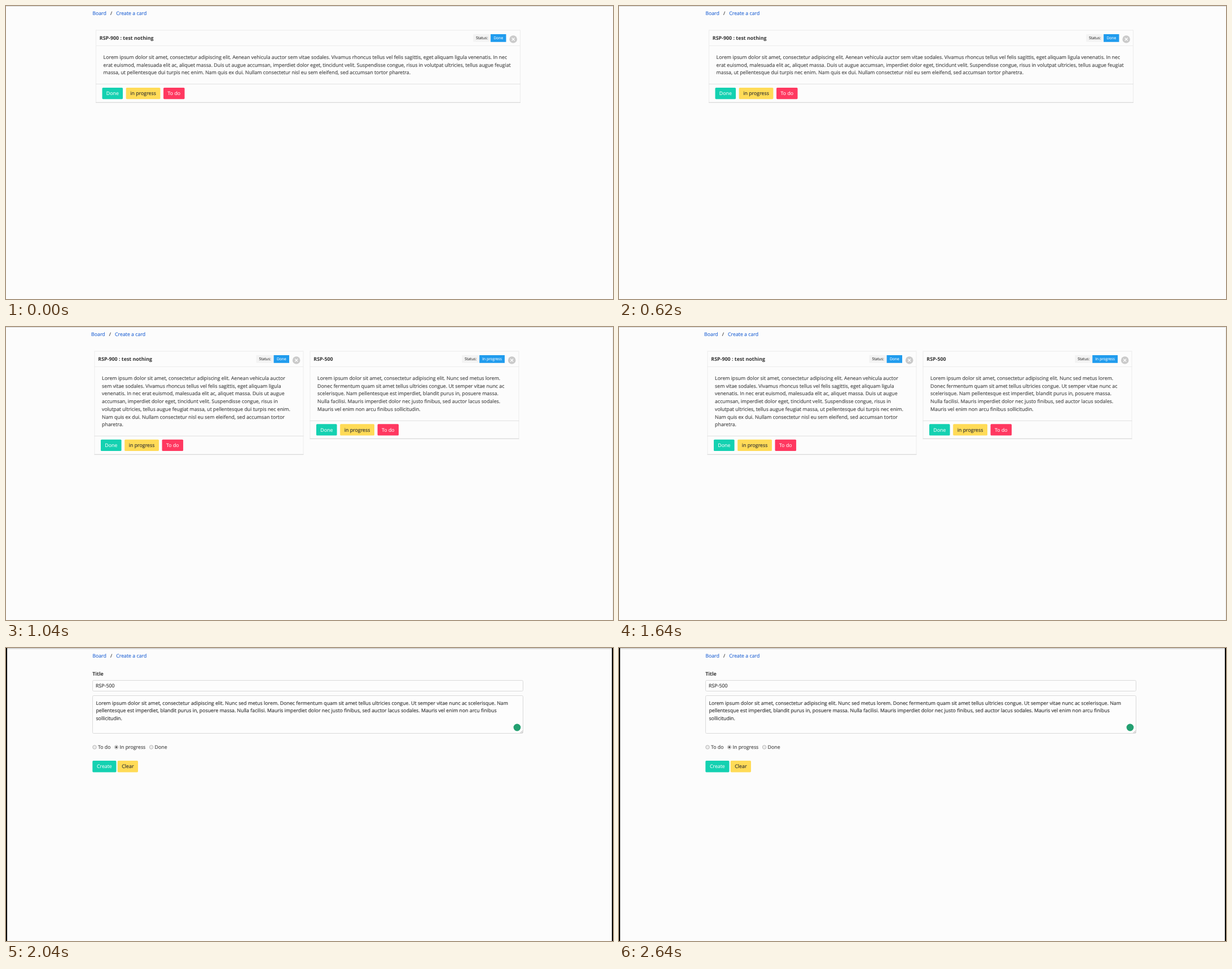
Recreate the animation shown at these times as an HTML page. Size 1076 by 520 pixels, loop 3040 ms.

```html
<!DOCTYPE html>
<html lang="en">
<head>
<meta charset="utf-8">
<title>Card board</title>
<style>
  html, body { margin: 0; width: 100%; height: 100%; overflow: hidden; background: #fcfcfc; }
  svg { display: block; }
  text {
    --ink: #444;
    font: 8.8px "Open Sans", "Noto Sans", sans-serif;
    fill: var(--ink);
    stroke: var(--ink);
    stroke-width: .16px;
    text-rendering: geometricPrecision;
    white-space: pre;
  }
  .bold { font-weight: 700; font-size: 8.9px; stroke: none; --ink: #333; }
  .dark { --ink: #333; }
  .link { --ink: #2c6bd6; }
  .white { --ink: #fff; stroke-width: .08px; }
  .tag { font-size: 6.7px; stroke-width: .08px; }
  .mid { text-anchor: middle; }
</style>
</head>
<body>
<svg id="stage" width="1076" height="520" viewBox="0 0 1076 520"></svg>
<script>
const LINE = 13.7;
const GREEN = '#14d1b1', YELLOW = '#ffdb57', RED = '#ff3860', BLUE = '#209cee';

const text = (x, y, s, cls = '') => `<text x="${x}" y="${y}" class="${cls}">${s}</text>`;
const rect = (x, y, w, h, fill, extra = '') =>
  `<rect x="${x}" y="${y}" width="${w}" height="${h}" fill="${fill}" ${extra}/>`;
const rule = (x, y, w, color) => rect(x, y, w, 1, color);
const lines = (x, y, rows, cls) => rows.map((s, i) => text(x, y + i * LINE, s, cls)).join('');

const button = (x, y, w, fill, label) =>
  rect(x, y, w, 20.3, fill, 'rx="1.6"') +
  text(x + w / 2, y + 13.3, label, 'mid ' + (fill === YELLOW ? 'dark' : 'white'));

const crumbs = (x, y) =>
  text(x, y, 'Board', 'link') + text(x + 33.4, y, '/', 'mid dark') + text(x + 42, y, 'Create a card', 'link');

function card(x, w, title, status, statusWidth, rows) {
  const right = x + w, foot = 97.8 + rows.length * LINE, bottom = Math.round(foot + 32);
  const tag = right - 25.5 - statusWidth;
  const cx = right - 12.8, cy = 59;
  return rect(x + .5, 43, w - 1, bottom - 43, 'none', 'stroke="#ececec"') +
    rule(x, 70, w, '#ececec') +
    rule(x, Math.floor(foot), w, '#e1e1e1') +
    rule(x, bottom - .2, w, '#d8d8d8') +
    text(x + 6.8, 60, title, 'bold') +
    rect(tag - 31, 50, 31, 13.8, '#f3f3f3', 'rx="1"') + text(tag - 15.5, 59.2, 'Status:', 'tag mid dark') +
    rect(tag, 50, statusWidth, 13.8, BLUE) + text(tag + statusWidth / 2, 59.2, status, 'tag mid white') +
    `<circle cx="${cx}" cy="${cy}" r="6.8" fill="#cacaca"/>` +
    `<path d="M${cx - 2.5} ${cy - 2.5}l5 5m0 -5l-5 5" stroke="#fff" stroke-width="1.2"/>` +
    lines(x + 13.6, 94, rows) +
    button(x + 11.5, foot + 6, 36.6, GREEN, 'Done') +
    button(x + 53.7, foot + 6, 60.8, YELLOW, 'in progress') +
    button(x + 120.1, foot + 6, 37.5, RED, 'To do');
}

const radio = (x, label, on) =>
  `<circle cx="${x}" cy="176" r="3.3" fill="#ececec" stroke="#a8a8a8" stroke-width=".8"/>` +
  (on ? `<circle cx="${x}" cy="176" r="1.8" fill="#505050"/>` : '') +
  text(x + 5.9, 179.4, label);

const field = (y, h) => rect(153.5, y, 763, h, '#fdfdfd', 'rx="2" stroke="#d9d9d9"');

const topBar = rule(0, 0, 1076, '#d6d6d6');

const oneCard = topBar + crumbs(153.2, 16) +
  card(159, 753, 'RSP-900 : test nothing', 'Done', 27.4, [
    'Lorem ipsum dolor sit amet, consectetur adipiscing elit. Aenean vehicula auctor sem vitae sodales. Vivamus rhoncus tellus vel felis sagittis, eget aliquam ligula venenatis. In nec',
    'erat euismod, malesuada elit ac, aliquet massa. Duis ut augue accumsan, imperdiet dolor eget, tincidunt velit. Suspendisse congue, risus in volutpat ultricies, tellus augue feugiat',
    'massa, ut pellentesque dui turpis nec enim. Nam quis ex dui. Nullam consectetur nisl eu sem eleifend, sed accumsan tortor pharetra.'
  ]);

const twoCards = topBar + rect(1075, 0, 1, 520, '#ececec') + crumbs(151, 16) +
  card(156.5, 371, 'RSP-900 : test nothing', 'Done', 27.4, [
    'Lorem ipsum dolor sit amet, consectetur adipiscing elit. Aenean vehicula auctor',
    'sem vitae sodales. Vivamus rhoncus tellus vel felis sagittis, eget aliquam ligula',
    'venenatis. In nec erat euismod, malesuada elit ac, aliquet massa. Duis ut augue',
    'accumsan, imperdiet dolor eget, tincidunt velit. Suspendisse congue, risus in',
    'volutpat ultricies, tellus augue feugiat massa, ut pellentesque dui turpis nec enim.',
    'Nam quis ex dui. Nullam consectetur nisl eu sem eleifend, sed accumsan tortor',
    'pharetra.'
  ]) +
  card(538.5, 371, 'RSP-500', 'In progress', 44.8, [
    'Lorem ipsum dolor sit amet, consectetur adipiscing elit. Nunc sed metus lorem.',
    'Donec fermentum quam sit amet tellus ultricies congue. Ut semper vitae nunc ac',
    'scelerisque. Nam pellentesque est imperdiet, blandit purus in, posuere massa.',
    'Nulla facilisi. Mauris imperdiet dolor nec justo finibus, sed auctor lacus sodales.',
    'Mauris vel enim non arcu finibus sollicitudin.'
  ]);

const form = rect(0, 0, 1076, 2, '#d6d6d6') + rect(0, 0, 2, 520, '#000') + rect(1074, 0, 2, 520, '#000') +
  crumbs(153.2, 17) +
  text(153.2, 48.6, 'Title', 'bold') +
  field(57.5, 19) + text(159, 70.4, 'RSP-500', 'dark') +
  field(84.5, 67) +
  lines(159.4, 100.5, [
    'Lorem ipsum dolor sit amet, consectetur adipiscing elit. Nunc sed metus lorem. Donec fermentum quam sit amet tellus ultricies congue. Ut semper vitae nunc ac scelerisque. Nam',
    'pellentesque est imperdiet, blandit purus in, posuere massa. Nulla facilisi. Mauris imperdiet dolor nec justo finibus, sed auctor lacus sodales. Mauris vel enim non arcu finibus',
    'sollicitudin.'
  ], 'dark') +
  '<circle cx="906" cy="141" r="6.4" fill="#23a071"/>' +
  '<path d="M911.5 151l4.5 -4.5M914 151l2 -2" stroke="#999" stroke-width=".8"/>' +
  radio(157, 'To do') + radio(195.6, 'In progress', true) + radio(257.6, 'Done') +
  button(153.3, 200.1, 42.2, GREEN, 'Create') +
  button(197.8, 200.1, 36.2, YELLOW, 'Clear');

const stage = document.getElementById('stage');
stage.innerHTML = [oneCard, twoCards, form].map(s => `<g>${s}</g>`).join('');
const scenes = [...stage.children];
const start = performance.now();

function draw() {
  const t = (performance.now() - start) % 3040;
  const current = t < 1040 ? 0 : t < 2040 ? 1 : 2;
  scenes.forEach((g, i) => g.style.display = i === current ? '' : 'none');
  requestAnimationFrame(draw);
}
draw();
</script>
</body>
</html>
```
